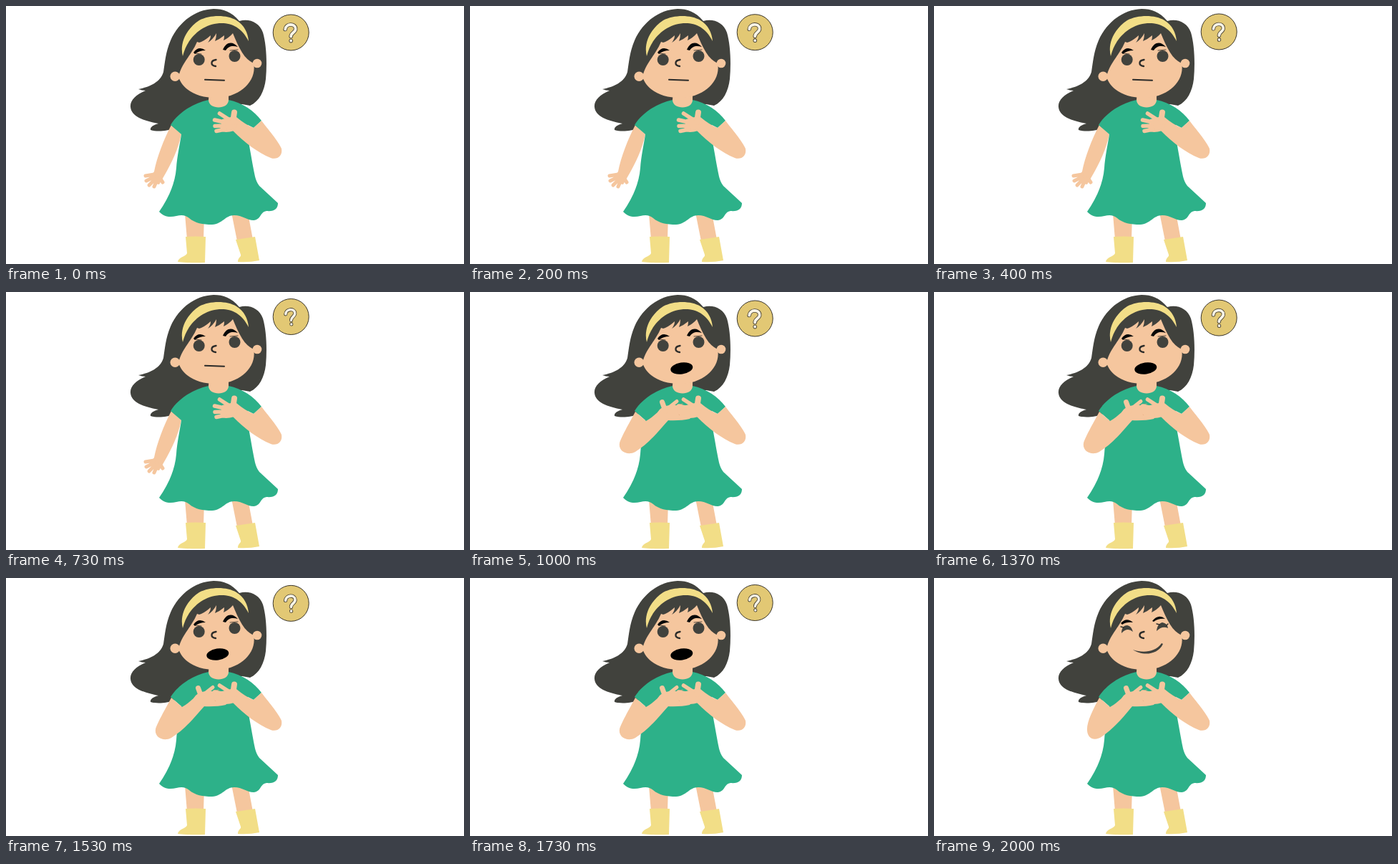
Recreate the animation shown at these times as an HTML page. Size 640x360 px, loop 4010 ms.

```html
<!DOCTYPE html>
<html lang="en">
<head>
<meta charset="utf-8">
<title>Thinking girl</title>
<style>
  html, body { margin: 0; width: 100%; height: 100%; overflow: hidden; background: #fff; }
  svg { display: block; width: 100%; height: 100%; }
  .hair { fill: #41423d; }
  .skin { fill: #f5c69e; }
  .dress { fill: #2db189; }
  .yellow { fill: #f2de87; }
  .finger { fill: none; stroke: #f5c69e; stroke-linecap: round; stroke-linejoin: round; }
  .line { fill: none; stroke: #2b2b29; stroke-width: 2; stroke-linecap: round; }
  .crease { fill: none; stroke: #e5ad85; stroke-width: .8; stroke-linecap: round; }
  .brow { fill: #090909; }
  .mark { fill: none; stroke-linecap: round; stroke-linejoin: round; }
</style>
</head>
<body>
<svg viewBox="0 0 640 360">
  <defs>
    <path id="hook" d="M-8 -4.5C-7 -13 6 -13 6.5 -5.5C7 0 0 0 0 5.500M0 11.500V11.600"/>
  </defs>

  <!-- back hair -->
  <path class="hair" d="M290 4C264 5 241 23 230 48C223 64 222 80 220 92C216 106 201 113 185 116Q190 118 195 118C181 124 173 132 174 141C175 154 192 160 213 164C206 166 201 169 202 173C212 176 226 174 234 171L290 145L330 137L341 139C354 133 361 119 363 102C365 80 364 54 359 37C354 23 340 17 326 21C315 8 304 4 290 4Z"/>

  <!-- legs and boots -->
  <path class="skin" d="M250 290H277L276 326H253ZM315 288L339 294L345 326L323 328Z"/>
  <path class="yellow" d="M251 322Q265 321 279 322L278 358Q258 359 240 357C241 350 251 350 253 345ZM321 326Q335 324 348 322L354 355Q340 358 324 357C324 351 329 350 328 347Z"/>

  <!-- hanging arm -->
  <g id="armDown">
    <path class="skin" d="M231 166C220 187 211 211 207 231L202 238Q204 249 214 249L221 237C231 220 241 199 245 179Z"/>
    <path class="finger" stroke-width="5" d="M207 235L195 237M206 239L196 244M208 242L200 250M211 243L207 252M215 240L219 246"/>
  </g>

  <!-- neck and dress -->
  <path class="dress" d="M283 131C260 136 240 150 230 166L245 179C243 193 239 210 238 226C236 249 227 268 214 287C221 295 230 295 238 293C246 291 251 292 256 296C264 303 275 305 288 305C303 304 306 292 319 292C330 292 337 299 346 299C357 298 354 288 364 286C375 287 380 283 380 275L354 251Q350 246 348 238C344 219 342 205 339 190L338 166L346 170L357 160C347 146 330 135 311 131Z"/>
  <path class="skin" d="M284 118H311V131C311 145 283 145 283 131Z"/>

  <!-- head -->
  <circle class="skin" cx="236.300" cy="98.300" r="6.800"/>
  <circle class="skin" cx="351" cy="80" r="6.300"/>
  <path class="skin" d="M241 99C244 84 254 73 260 63Q264 57 267 50L270 51Q277 49 286 41Q286 46 282 51Q289 47 294 38Q294 44 292 49Q299 46 305 41Q305 45 304 48Q312 44 317 38C321 48 325 57 330 65Q336 75 346 80C351 104 327 128 293 128C267 128 247 117 241 99Z"/>
  <path class="yellow" d="M247 70C242 51 253 31 270 20C285 12 309 12 322 20C333 27 338 37 339 49C329 29 314 23 298 24C273 26 253 45 247 70Z"/>
  <path class="line" style="stroke-width:2.300" d="M293.500 75C285.500 76 285.500 83 293 84"/>

  <!-- open-eyed face -->
  <g id="openEyes">
    <circle class="hair" cx="269.700" cy="75" r="8"/>
    <circle class="hair" cx="319.500" cy="70" r="8"/>
    <path class="brow" d="M262 65Q269 55 279 62Q270 62 264 67ZM303 61C308 49 317 49 324 57C316 55 311 56 307 62Z"/>
    <path class="line" style="stroke-width:.800" d="M264 66L273 67M313 62L324 61"/>
  </g>
  <path id="flatMouth" class="line" d="M278 102.800L305 103.800"/>
  <ellipse id="openMouth" cx="295.800" cy="106.500" rx="15.600" ry="8" transform="rotate(-8 295.800 106.500)"/>

  <!-- smiling face -->
  <g id="smile">
    <path class="brow" d="M261 63Q269 54 278 62Q269 61 263 65ZM305 60Q314 49 323 57Q314 56 307 61Z"/>
    <path class="hair" d="M262 77C262 69 266 66 270 66Q276 67 278 75Q270 68 262 77ZM311 74C312 66 315 63 319 62Q326 63 327 70Q319 66 311 74Z"/>
    <path class="line" style="stroke-width:1.300" d="M265 69L261 68M315 65L311 64M325 66L327 64"/>
    <path class="hair" d="M278 100C291 105 309 104 318 91L320 92C312 109 289 108 278 100Z"/>
  </g>

  <!-- raised left arm, elbow varies per scene -->
  <g id="armUp">
    <path id="elbow" class="skin"/>
    <path class="skin" d="M262 168Q267 159 279 158L303 158L315 168L307 177Q294 180 275 179Z"/>
    <path class="finger" stroke-width="7" d="M273 166L268.500 153.500"/>
    <path class="finger" stroke-width="5" d="M277 162L289 152.500"/>
    <path class="crease" d="M292 171Q296 174 294 177M289 158L297 156"/>
  </g>

  <!-- right arm -->
  <path class="skin" d="M357 160C366 172 381 189 385 199C387 210 378 215 370 212C352 205 333 190 317 174L311 160L322 155Q335 166 346 170Z"/>
  <path class="skin" d="M302 158L318 154L325 161L319 174Q306 178 299 174Z"/>
  <path class="finger" stroke-width="8" d="M317 162L319 148.500"/>
  <path class="finger" stroke-width="5.500" d="M311 158L298.500 150M305 162L291.500 159M304 167L292 167.500M306 172L294 174.500"/>

  <!-- question badge -->
  <g id="badge">
    <circle r="25" fill="#e2c874" stroke="#3a352a"/>
    <g id="mark" class="mark">
      <use href="#hook" stroke="#4a4436" stroke-width="5.600"/>
      <use href="#hook" stroke="#fbf6e8" stroke-width="3.800"/>
    </g>
  </g>
</svg>
<script>
  const LOOP = 4010, SCENE = 1000;
  const el = id => document.getElementById(id);
  const show = (id, on) => el(id).setAttribute('display', on ? 'inline' : 'none');

  const elbows = {
    wide: 'M231 167C222 184 211 203 209 211C207 222 220 229 231 223C248 213 263 195 277 179L270 160Q258 173 246 180Z',
    soft: 'M231 167C222 184 213 201 214 213C215 225 225 228 235 221C250 211 264 195 277 179L270 160Q258 173 246 180Z'
  };

  function render(t) {
    const scene = Math.min(2, Math.floor(t / SCENE));
    const p = (t % SCENE) / SCENE;
    const happy = scene === 2;

    show('armDown', scene === 0);
    show('armUp', scene > 0);
    show('openEyes', !happy);
    show('flatMouth', scene === 0);
    show('openMouth', scene === 1);
    show('smile', happy);
    show('badge', !happy);
    el('elbow').setAttribute('d', happy ? elbows.soft : elbows.wide);

    // the badge floats up while its mark shrinks, restarting with each scene
    const rise = (1 - Math.cos(Math.PI * p)) / 2;
    el('badge').setAttribute('transform', `translate(398.2 ${37 - 3 * rise})`);
    el('mark').setAttribute('transform', `rotate(${-4 * rise}) scale(${1 - 0.12 * rise})`);
  }

  const start = performance.now();
  function tick(now) {
    render(Math.max(0, now - start) % LOOP);
    requestAnimationFrame(tick);
  }
  render(0);
  requestAnimationFrame(tick);
</script>
</body>
</html>
```
